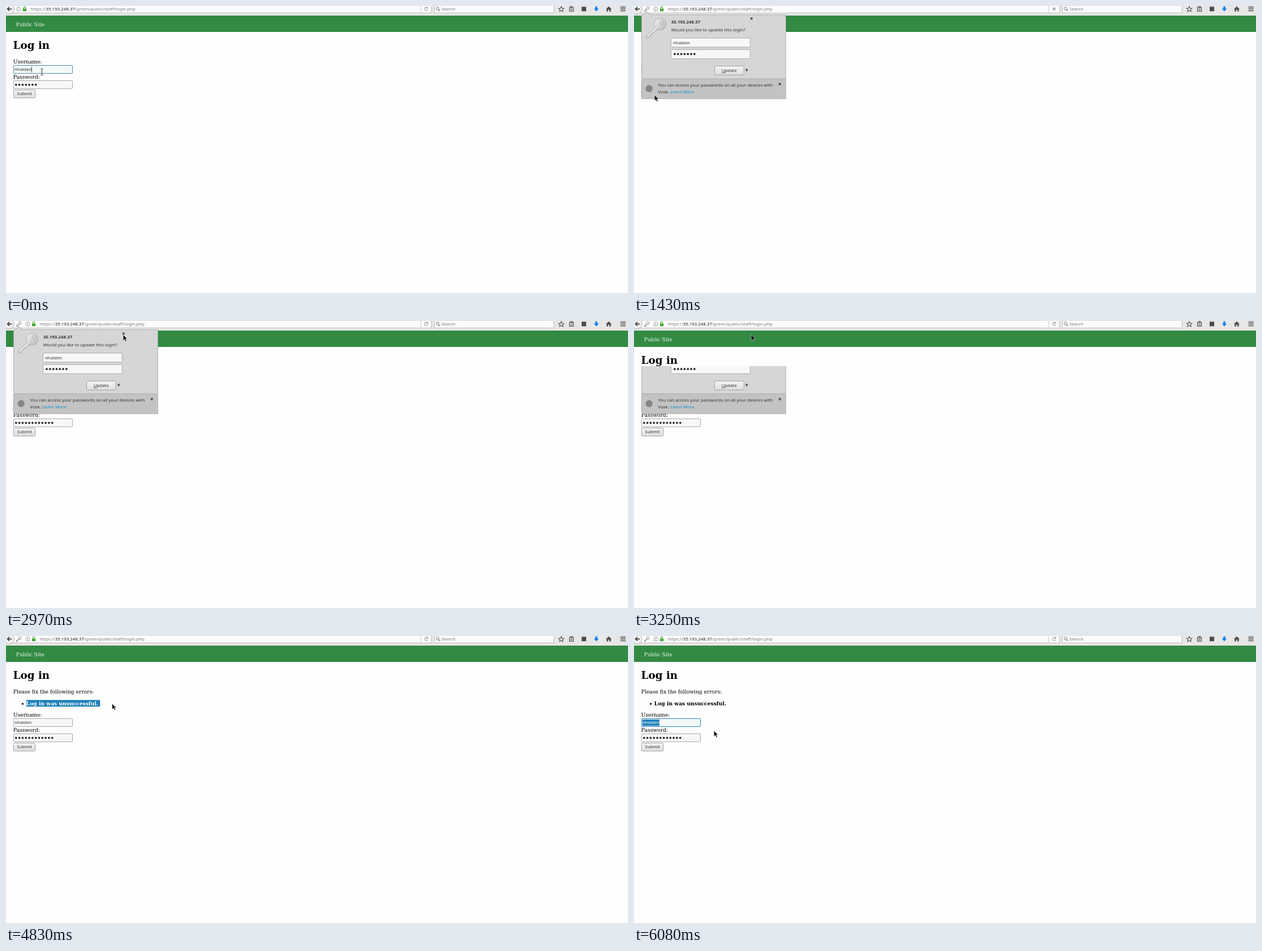
These frames come from a looping animation (1100 by 509 pixels, 8 s). An HTML page:

```html
<!DOCTYPE html>
<html lang="en">
<head>
<meta charset="utf-8">
<title>Log in</title>
<style>
  html, body { margin: 0; width: 100%; height: 100%; overflow: hidden; background: #fefefe; }
  svg { display: block; width: 100%; height: 100%; }
  text { white-space: pre; }
  .ui { font: 7.85px "Noto Sans", "Open Sans", sans-serif; fill: #333; }
  .page { font: 9.17px "DejaVu Serif", "Noto Serif", serif; fill: #000; }
  .bold { font-weight: bold; }
</style>
</head>
<body>
<svg id="stage" viewBox="0 0 1100 509" preserveAspectRatio="none"></svg>
<script>
const USER = "nhalden";
const HOST = "35.193.248.37";
const LOOP = 8000;
const ERROR = "Log in was unsuccessful.";

const box = (x, y, w, h, fill, stroke = "none", extra = "") =>
  `<rect x="${x}" y="${y}" width="${w}" height="${h}" fill="${fill}" stroke="${stroke}" ${extra}/>`;
const path = (d, fill, stroke = "none", width = 1, extra = "") =>
  `<path d="${d}" fill="${fill}" stroke="${stroke}" stroke-width="${width}" ${extra}/>`;
const disc = (x, y, r, fill, stroke = "none", width = 1) =>
  `<circle cx="${x}" cy="${y}" r="${r}" fill="${fill}" stroke="${stroke}" stroke-width="${width}"/>`;
const text = (x, y, str, cls = "ui", extra = "") =>
  `<text x="${x}" y="${y}" class="${cls}" ${extra}>${str}</text>`;
const group = (id, body, extra = "") => `<g id="${id}" ${extra}>${body}</g>`;
const dots = (n, x, y) =>
  Array.from({ length: n }, (_, i) => disc(x + i * 5.82, y, 1.85, "#2b2b2b")).join("");
const cross = (x, y, r, color, width) =>
  path(`M${x - r} ${y - r}l${2 * r} ${2 * r}m0 ${-2 * r}l${-2 * r} ${2 * r}`, "none", color, width);

const defs = `<defs>
  <linearGradient id="button" x2="0" y2="1">
    <stop stop-color="#f4f4f4"/><stop offset="1" stop-color="#dedede"/>
  </linearGradient>
  <linearGradient id="lit" x2="0" y2="1">
    <stop stop-color="#fff"/><stop offset="1" stop-color="#eee"/>
  </linearGradient>
  <linearGradient id="metal" x2="1" y2="1">
    <stop stop-color="#f6f6f6"/><stop offset="1" stop-color="#b4b4b4"/>
  </linearGradient>
  <clipPath id="popupClip"><rect id="popupWindow" x="0" width="300" height="170"/></clipPath>
  <clipPath id="selectClip"><rect id="selectWindow" x="36" y="113" height="13"/></clipPath>
</defs>`;

function toolbar() {
  const ink = "#4a4a4a";
  const address = group("address",
    disc(22.3, 5.5, 3.7, "none", "#8a8a8a", .8) +
    path("M22.3 4.9v2.8M22.3 3.1v.9", "none", "#777", .9) +
    box(29.8, 4.7, 6.2, 4.6, "#45a52c", "none", 'rx=".5"') +
    path("M31.1 5V3.4a1.8 1.8 0 0 1 3.6 0V5", "none", "#45a52c", 1.1) +
    text(43.5, 8.2, `https://<tspan fill="#1c1c1c">${HOST}</tspan>/green/public/staff/login.php`, "ui", 'style="fill:#7b7b7b"'));
  const key = group("urlKey",
    path("M23 5.2l-5 4.6M19.5 8.4l1.2 1.2", "none", "#888", 1.5) +
    disc(24.5, 3.9, 2.3, "#fcfcfc", "#888", 1));
  const reload = group("reload",
    path("M745.2 3.4A2.8 2.8 0 1 0 745.6 6.4", "none", "#777", 1) +
    path("M743.3 4.6h3V1.7z", "#777"));
  const stop = group("stop", cross(743, 5.3, 2.3, "#777", 1.1));
  const icons =
    path("M982 .9l1.4 3.1 3.3.3-2.5 2.3.8 3.3-3-1.8-3 1.8.8-3.3-2.5-2.3 3.3-.3z", "none", ink, 1.1) +
    path("M996.5 2.5h7v7h-7zM998.3 2.2V1.1h3.4v1.1M998 5h4M998 7.2h4", "none", ink, 1.1) +
    box(1018, 1.3, 8, 8, ink) +
    path("M1042.3.8h3.4v3.8h2.6l-4.3 4.9-4.3-4.9h2.6z", "#0a7ff0") +
    path("M1066 .8l5 4.7h-1.3v4.2h-2.5V6.5h-2.4v3.2h-2.5V5.5h-1.3z", ink) +
    path("M1086.5 2.1h9.2M1086.5 5.3h9.2M1086.5 8.5h9.2", "none", ink, 1.5);
  return box(0, 0, 1100, 17, "#e7e7e6") +
    box(8, -4, 744.5, 16.3, "#fcfcfc", "#b5b5b5", 'stroke-width=".9"') +
    path("M733.5 0V12", "none", "#c8c8c8", .9) +
    box(757.5, -4, 211.5, 16.3, "#fcfcfc", "#b5b5b5", 'stroke-width=".9"') +
    disc(5.5, 5.3, 8.7, "#f1f1f1", "#a4a4a4", .9) +
    path("M10.3 5.3H2.8M6 1.9L2.5 5.3 6 8.7", "none", "#3f3f3f", 1.7) +
    address + key + reload + stop +
    group("dropdown", path("M722 3.5h6l-3 4z", "#777")) +
    disc(763.2, 4.5, 2.6, "none", "#777", 1) +
    path("M765.1 6.4l2.4 2.6", "none", "#777", 1.3) +
    text(770, 8.2, "Search", "ui", 'style="fill:#777"') + icons;
}

function page() {
  const errors = group("errors",
    text(12.8, 102, "Please fix the following errors:", "page") +
    disc(29.5, 120.3, 1.6, "#000") +
    text(35.8, 123, ERROR, "page bold") +
    group("selection",
      box(36, 113.5, 130.3, 11.8, "#1c7fb8") +
      text(35.8, 123, ERROR, "page bold", 'style="fill:#fff"'),
      'clip-path="url(#selectClip)"'));
  const form = group("form",
    text(12.8, 102, "Username:", "page") +
    box(13.3, 105.4, 104.2, 14.2, "#f7f7f7", "#a6a6a6", 'id="userField" rx="1"') +
    group("userSelect", box(14.8, 107.2, 30.2, 11, "#1c7fb8")) +
    text(15, 115.3, USER, "ui", 'id="userText"') +
    group("caret", path("M45.4 107.5V118", "none", "#222", .8)) +
    text(12.8, 129, "Password:", "page") +
    box(13.3, 132.4, 104.2, 14.2, "#f7f7f7", "#a6a6a6", 'rx="1"') +
    group("shortPass", dots(7, 17.8, 139.7)) +
    group("longPass", dots(12, 17.8, 139.7)) +
    box(13.3, 148.8, 38.4, 14.2, "url(#button)", "#a0a0a0", 'id="submit" rx="1.5"') +
    text(19.6, 158.4, "Submit"));
  return box(0, 17, 1100, 29, "#328a43") +
    text(17.8, 35.8, "Public Site", "page", 'style="fill:#f2f7f2"') +
    text(12.6, 76, "Log in", "page bold", 'style="font-size:18.33px"') +
    errors + form;
}

function popup() {
  const key =
    path("M41 36L22.5 52.5 21.5 57l5 -.5 2-2.5 .3-2.8 3-.2 .4-3 3-.3 9.8-8.2z", "url(#metal)", "#9a9a9a", .8) +
    path("M37 27C40 21.5 49 20.5 54 24.5 58.5 29 57 38 51.5 41.5 46 44.5 39 41.5 36.5 37 34.8 33.5 35.3 30 37 27z", "url(#metal)", "#a0a0a0", .8) +
    disc(49.3, 28.7, 3.2, "#d6d6d6", "#a0a0a0", .8) +
    path("M40.5 37.5L24.5 52.8", "none", "#fafafa", 1.1);
  return group("popup",
    path("M13.5 15.5H16L22.5 10l6.5 5.5H268.5V164.5H13.5z", "#d6d6d6", "#a9a9a9", .9) +
    box(14, 129, 254.2, 35.2, "#c3c3c3") +
    path("M14 129H268", "none", "#adadad", 1) +
    key +
    text(65.7, 30.6, HOST, "ui bold") +
    text(65.7, 45, "Would you like to update this login?") +
    cross(207.8, 22.3, 1.8, "#333", 1.3) +
    box(65.4, 56.9, 140, 16, "#f7f7f7", "#a9a9a9", 'rx="1"') +
    text(69, 67.6, USER) +
    box(65.4, 77.2, 140, 16.2, "#f7f7f7", "#a9a9a9", 'rx="1"') +
    dots(7, 72, 85.2) +
    box(142.6, 106.5, 51.8, 15.7, "url(#button)", "#a0a0a0", 'rx="1.5"') +
    text(154.8, 117.1, '<tspan text-decoration="underline">U</tspan>pdate') +
    path("M196.8 111.7h5l-2.5 5.4z", "#555") +
    disc(26.7, 146.5, 6.2, "#858585") +
    text(42.6, 143.2, "You can access your passwords on all your devices with") +
    text(42.6, 154.6, 'Vusk. <tspan fill="#0a8fd0">Learn More</tspan>') +
    cross(257.9, 138.6, 1.8, "#333", 1.3),
    'clip-path="url(#popupClip)"');
}

const cursors =
  group("arrow", path("M0 0V10.2L2.4 8 4.2 11.8 5.9 11 4.2 7.3H7.4z", "#111", "#fff", .5)) +
  group("beam", path("M-2.2 -5.5H-.7L0 -4.8 .7 -5.5H2.2M0 -4.8V4.8M-2.2 5.5H-.7L0 4.8 .7 5.5H2.2", "none", "#333", 1));

document.getElementById("stage").innerHTML =
  defs + box(0, 0, 1100, 509, "#fefefe") + page() + toolbar() + popup() + cursors;

const el = id => document.getElementById(id);
const show = (id, on) => el(id).setAttribute("display", on ? "inline" : "none");
const set = (id, attrs) => {
  for (const name in attrs) el(id).setAttribute(name, attrs[name]);
};

// Pointer positions: start time, shape, x, y.
const pointer = [
  [0, "beam", 63.5, 117], [150, "beam", 63.3, 117], [300, "beam", 64, 117],
  [550, "arrow", 58, 125], [670, "arrow", 43, 150], [790, "arrow", 36.3, 158],
  [1680, "none", 0, 0], [1830, "arrow", 114.5, 119],
  [1980, "arrow", 165, 105], [2100, "arrow", 200, 91], [2220, "arrow", 214, 82],
  [2340, "arrow", 215, 60], [2460, "arrow", 212, 35], [2580, "arrow", 209, 10],
  [2700, "arrow", 208, 4], [2850, "arrow", 208, 17], [2970, "arrow", 207.2, 24.5],
  [3520, "arrow", 185, 40], [3640, "arrow", 125, 78], [3760, "arrow", 68, 112],
  [3880, "beam", 52.7, 114.8], [4130, "beam", 42, 119], [4250, "beam", 36.5, 121.5],
  [4560, "beam", 127, 120], [4680, "arrow", 180, 119.5], [4830, "arrow", 187.6, 120],
  [5080, "arrow", 182, 125], [5200, "arrow", 160, 136], [5320, "arrow", 125, 147],
  [5440, "beam", 90, 153], [5560, "beam", 76.3, 154.5], [5810, "beam", 76.6, 154.5],
  [5960, "arrow", 245, 197], [6080, "arrow", 141.3, 168]
];

function render(t) {
  const within = (from, to = LOOP) => t >= from && t < to;
  const failed = t >= 1830;
  const asked = t >= 1430;

  set("address", { transform: `translate(${asked ? 16.2 : 0} 0)` });
  show("urlKey", asked);
  show("reload", !within(1280, 1830));
  show("stop", within(1280, 1830));
  show("dropdown", within(2580, 2850));

  show("errors", failed);
  set("form", { transform: `translate(0 ${failed ? 41 : 0})` });
  show("shortPass", !failed);
  show("longPass", failed);

  const first = t < 1160;
  const again = t >= 5560;
  const picked = t >= 5810;
  set("userField", {
    stroke: first ? "#4a8a9e" : again ? "#1c7fc0" : "#a6a6a6",
    fill: first || again ? "#f4f8f9" : "#f7f7f7"
  });
  show("caret", first || (again && !picked));
  show("userSelect", picked);
  el("userText").style.fill = picked ? "#fff" : "#333";
  set("submit", {
    fill: within(670, 1160) || within(1280, 1830) ? "url(#lit)" : within(1160, 1280) ? "#d8d8d8" : "url(#button)",
    stroke: within(1160, 1830) ? "#3b8ec2" : "#a0a0a0"
  });

  show("popup", within(1430, 3370));
  set("popupWindow", { y: t < 3250 ? 0 : 80 });

  show("selection", within(4560, 5560));
  set("selectWindow", { width: t < 4680 ? 39 : t < 4830 ? 91 : 131 });

  const [, shape, x, y] = pointer.findLast(p => p[0] <= t);
  for (const id of ["arrow", "beam"]) {
    show(id, id === shape);
    set(id, { transform: `translate(${x} ${y})` });
  }
}

const start = performance.now();
function tick() {
  render((performance.now() - start) % LOOP);
  requestAnimationFrame(tick);
}
tick();
</script>
</body>
</html>
```
